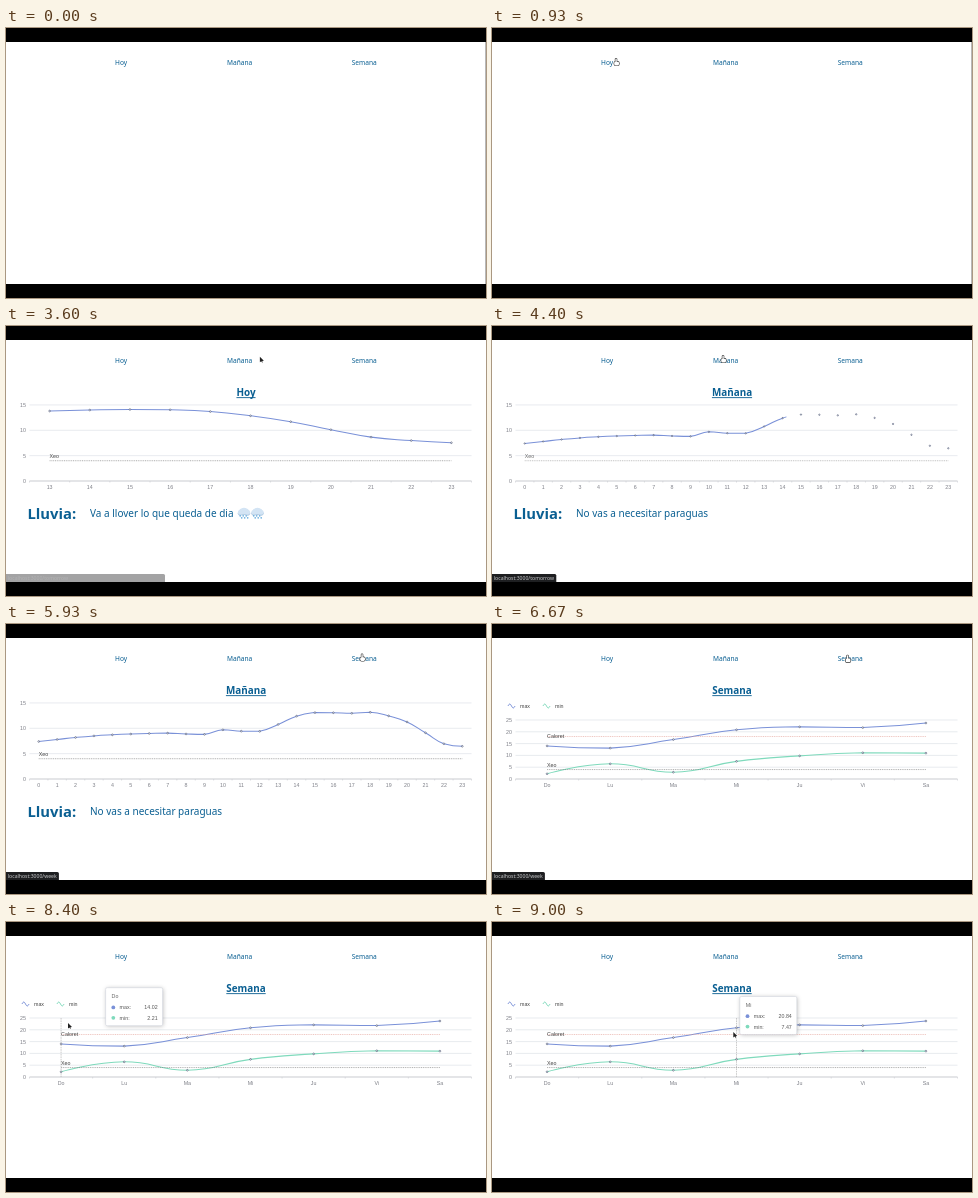
Write an HTML page with a canvas that moves like this. It is 480 by 270 pixels and loops after 9070 ms.

```html
<!DOCTYPE html>
<html lang="es">
<head>
<meta charset="utf-8">
<title>Tiempo</title>
<style>
html, body { margin: 0; width: 100%; height: 100%; overflow: hidden; background: #000; }
canvas { display: block; width: 480px; height: 270px; }
</style>
</head>
<body>
<canvas id="stage"></canvas>
<script>
const LOOP = 9070;
const canvas = document.getElementById('stage');
const ctx = canvas.getContext('2d');
const dpr = window.devicePixelRatio || 1;
canvas.width = 480 * dpr;
canvas.height = 270 * dpr;

const UI = '"Noto Sans", "Open Sans", sans-serif';
const PLOT = '"Liberation Sans", Arial, sans-serif';
const TEAL = '#0a5f92', BLUE = '#7a91d8', GREEN = '#7fdabc', GREY = '#7c7e86';
const LEFT = 23.5, RIGHT = 465.5, BASE = 155;

const clamp = (v, a, b) => Math.max(a, Math.min(b, v));
const ramp = (t, a, b) => clamp((t - a) / (b - a), 0, 1);
const ease = p => p * p * (3 - 2 * p);
const range = (from, to) => Array.from({ length: to - from + 1 }, (_, i) => from + i);

// smooth curve through a few [hour, degrees] knots
function curve(knots) {
  const slope = i => {
    const a = knots[Math.max(i - 1, 0)], b = knots[Math.min(i + 1, knots.length - 1)];
    return (b[1] - a[1]) / (b[0] - a[0]);
  };
  return x => {
    let i = 0;
    while (i < knots.length - 2 && knots[i + 1][0] < x) i++;
    const [x0, y0] = knots[i], [x1, y1] = knots[i + 1];
    const h = x1 - x0, u = (x - x0) / h;
    return y0 + (y1 - y0) * ease(u) + h * u * (1 - u) * ((1 - u) * slope(i) - u * slope(i + 1));
  };
}

const XEO = { name: 'Xeo', value: 4, color: '#777', lift: 3 };
const CALORET = { name: 'Caloret', value: 18, color: '#e39c93', lift: -1.9 };

function dayPage(title, start, sweep, from, rain, snow, knots) {
  const labels = range(from, 23);
  return {
    title, start, sweep, labels, rain, snow, unit: 5.07, top: 15, marks: [XEO],
    series: [{ color: BLUE, data: labels.map(curve(knots)) }]
  };
}

const pages = [
  dayPage('Hoy', 1600, [1690, 2150], 13, 'Va a llover lo que queda de dia', true,
    [[13, 13.8], [15, 14.1], [17, 13.7], [19, 11.7], [21, 8.65], [23, 7.55]]),
  dayPage('Mañana', 4195, [4165, 4550], 0, 'No vas a necesitar paraguas', false,
    [[0, 7.4], [3, 8.5], [7, 9.05], [9, 8.8], [10, 9.7], [12, 9.4], [14, 12.4], [15, 13.1],
      [17, 12.95], [18, 13.15], [20, 11.25], [22, 6.95], [23, 6.45]]),
  {
    title: 'Semana', start: 6130, sweep: [6120, 6520], unit: 2.36, top: 25, legend: true,
    labels: ['Do', 'Lu', 'Ma', 'Mi', 'Ju', 'Vi', 'Sa'], marks: [CALORET, XEO],
    series: [
      { name: 'max', color: BLUE, data: [14.02, 13.08, 16.71, 20.84, 22.09, 21.78, 23.72] },
      { name: 'min', color: GREEN, data: [2.21, 6.42, 2.87, 7.47, 9.79, 11.12, 10.96] }
    ]
  }
];

const NAV = [['Hoy', 109, 124], ['Mañana', 221, 248], ['Semana', 345.7, 373]];

// pointer moves: start, end, x, y
const moves = [
  [70, 930, 124, 30.5], [1000, 1330, 115, 29.5], [2930, 3330, 258, 31], [3470, 4000, 231, 29.5],
  [4870, 5470, 356, 30], [6600, 7000, 350, 46], [7070, 7500, 306, 111], [7580, 7670, 308, 102.5],
  [8000, 8400, 62, 101], [8500, 8870, 241.3, 110]
];

function pointer(t) {
  let x = 478, y = 78;
  for (const [from, to, mx, my] of moves) {
    const p = ease(ramp(t, from, to));
    x += (mx - x) * p;
    y += (my - y) * p;
  }
  return { x, y };
}

function text(s, x, y, size, color, { font = UI, align = 'left', weight = 400 } = {}) {
  ctx.font = `${weight} ${size}px ${font}`;
  ctx.textAlign = align;
  ctx.fillStyle = color;
  ctx.fillText(s, x, y);
}

const plotText = (s, x, y, color = GREY, align = 'left') =>
  text(s, x, y, 5.3, color, { font: PLOT, align });

function line(x0, y0, x1, y1, color, width = 0.7, dash = []) {
  ctx.strokeStyle = color;
  ctx.lineWidth = width;
  ctx.setLineDash(dash);
  ctx.beginPath();
  ctx.moveTo(x0, y0);
  ctx.lineTo(x1, y1);
  ctx.stroke();
  ctx.setLineDash([]);
}

function disc(x, y, r, fill) {
  ctx.beginPath();
  ctx.arc(x, y, r, 0, Math.PI * 2);
  ctx.fillStyle = fill;
  ctx.fill();
}

function box(x, y, w, h, r, fill) {
  ctx.beginPath();
  ctx.roundRect(x, y, w, h, r);
  ctx.fillStyle = fill;
  ctx.fill();
}

const edge = (page, i) => LEFT + (RIGHT - LEFT) / page.labels.length * i;
const column = (page, i) => edge(page, i + 0.5);

function smoothPath(pts) {
  const bound = (v, a, b) => clamp(v, Math.min(a, b), Math.max(a, b));
  const dx = (pts[1].x - pts[0].x) / 2;
  const arm = pts.map((p, i) => {
    const a = pts[i - 1], b = pts[i + 1];
    return a && b ? { x: dx, y: (b.y - a.y) / 4 } : { x: 0, y: 0 };
  });
  ctx.beginPath();
  ctx.moveTo(pts[0].x, pts[0].y);
  for (let i = 1; i < pts.length; i++) {
    const a = pts[i - 1], b = pts[i], u = arm[i - 1], v = arm[i];
    ctx.bezierCurveTo(
      a.x + u.x, bound(a.y + u.y, a.y, b.y),
      b.x - v.x, bound(b.y - v.y, a.y, b.y), b.x, b.y);
  }
}

function drawSeries(page, s, p) {
  const pts = s.data.map((v, i) => ({ x: column(page, i), y: BASE - v * page.unit }));
  ctx.save();
  ctx.beginPath();
  ctx.rect(LEFT, 60, (RIGHT - LEFT) * p, 120);
  ctx.clip();
  smoothPath(pts);
  ctx.strokeStyle = s.color;
  ctx.lineWidth = 1.05;
  ctx.stroke();
  ctx.restore();
  for (const q of pts) {
    disc(q.x, q.y, 0.4 + 0.45 * p, '#fff');
    ctx.strokeStyle = '#46506e';
    ctx.lineWidth = 0.6;
    ctx.stroke();
  }
}

function legendItem(x, s) {
  ctx.beginPath();
  for (let i = 0; i <= 7; i += 0.5) ctx.lineTo(x + i, 82 - 2 * Math.sin(i / 7 * Math.PI * 2));
  ctx.strokeStyle = s.color;
  ctx.lineWidth = 1;
  ctx.stroke();
  plotText(s.name, x + 12, 84, '#444');
}

function drawChart(page, t) {
  const p = ramp(t, ...page.sweep), n = page.labels.length;
  for (let v = 0; v <= page.top; v += 5) {
    const y = BASE - v * page.unit;
    line(LEFT, y, RIGHT, y, v ? '#dfe2e9' : '#b4b6bc');
    plotText(v, 20, y + 2, GREY, 'right');
  }
  page.labels.forEach((s, i) => plotText(s, column(page, i), 162.7, GREY, 'center'));
  for (let i = 0; i <= n; i++) line(edge(page, i), BASE, edge(page, i), BASE + 1.6, '#c4c6cc', 0.5);
  for (const s of page.series) drawSeries(page, s, p);
  ctx.globalAlpha = 0.4 + 0.6 * p;
  for (const m of page.marks) {
    const y = BASE - m.value * page.unit;
    line(column(page, 0), y, column(page, n - 1), y, m.color, 0.6, [1, 0.8]);
    plotText(m.name, column(page, 0), y - m.lift, '#444');
  }
  ctx.globalAlpha = 1;
  if (page.legend) page.series.forEach((s, i) => legendItem(16 + 35 * i, s));
}

function snowCloud(x, y) {
  for (const [drop, fill] of [[0.6, '#a9c4de'], [-0.2, '#d3e4f4']]) {
    for (let i = -2; i <= 2; i++) {
      const hump = Math.cos(i * 0.7);
      disc(x + i * 1.9, y - 1.8 * hump + drop, 2.2 + hump, fill);
    }
  }
  for (let i = 0; i < 6; i++) disc(x - 3.8 + i * 1.5, y + 2.8 + (i % 2) * 2, 0.85, '#6fb0de');
}

function drawPage(page, t) {
  text(page.title, 240, 70, 9.9, TEAL, { weight: 700, align: 'center' });
  const w = ctx.measureText(page.title).width;
  ctx.fillRect(240 - w / 2, 71.2, w, 0.9);
  drawChart(page, t);
  if (!page.rain) return;
  text('Lluvia:', 21.5, 193, 14.8, TEAL, { weight: 700 });
  text(page.rain, 84, 191, 10, TEAL);
  if (page.snow) for (const x of [238, 251.5]) snowCloud(x, 187);
}

function drawTooltip(page, t) {
  const shown = ramp(t, 7380, 7480);
  if (!shown) return;
  const now = pointer(t), late = pointer(t - 90);
  const i = clamp(Math.floor((now.x - LEFT) / (RIGHT - LEFT) * 7), 0, 6);
  const ax = column(page, i), x = late.x + 6.5, y = late.y - 35.5;
  line(ax, 96, ax, BASE, '#aaa', 0.6, [1.6, 0.8]);
  ctx.globalAlpha = shown;
  ctx.save();
  ctx.shadowColor = 'rgba(0,0,0,.25)';
  ctx.shadowBlur = 4 * dpr;
  ctx.shadowOffsetX = ctx.shadowOffsetY = 0.6 * dpr;
  box(x, y, 57, 38, 1.5, '#fff');
  ctx.restore();
  ctx.strokeStyle = '#ccd0da';
  ctx.lineWidth = 0.5;
  ctx.stroke();
  plotText(page.labels[i], x + 6, y + 10.7, '#666');
  page.series.forEach((s, k) => {
    const row = y + 19.7 + 10.4 * k;
    disc(x + 7.7, row, 1.9, s.color);
    plotText(s.name + ':', x + 14, row + 1.9, '#555');
    plotText(s.data[i].toFixed(2), x + 52, row + 1.9, '#555', 'right');
  });
  ctx.globalAlpha = 1;
}

// path, fade-in, fade-out, time of widening
const bubbles = [
  ['today', 1130, 3130, 1850], ['tomorrow', 3130, 3500, 0],
  ['tomorrow', 3800, 4990, LOOP], ['week', 5640, 7080, LOOP]
];

function drawStatus(t) {
  for (const [path, from, to, widen] of bubbles) {
    const alpha = ramp(t, from - 20, from + 90) * (1 - ramp(t, to, to + 170));
    if (!alpha) continue;
    const label = 'localhost:3000/' + path;
    ctx.font = `5.1px ${UI}`;
    const snug = ctx.measureText(label).width + 4;
    ctx.globalAlpha = alpha;
    box(0, 248, snug + (159 - snug) * ease(ramp(t, widen, widen + 350)), 8, [0, 1.5, 0, 0], '#1e1f21');
    text(label, 1.8, 253.8, 5.1, '#c9cacc');
    ctx.globalAlpha = 1;
  }
}

function outlined(fill, stroke) {
  ctx.lineJoin = 'round';
  ctx.lineWidth = 1.2;
  ctx.strokeStyle = stroke;
  ctx.fillStyle = fill;
  ctx.stroke();
  ctx.fill();
}

function arrow(x, y) {
  ctx.beginPath();
  for (const [dx, dy] of [[0, 0], [0, 5.6], [1.4, 4.5], [2.6, 6.6], [2.5, 4.2], [4, 4]]) {
    ctx.lineTo(x + dx, y + dy);
  }
  ctx.closePath();
  outlined('#222', '#fff');
}

function hand(x, y) {
  ctx.beginPath();
  ctx.roundRect(x - 0.6, y, 1.3, 5, 0.6);
  ctx.roundRect(x - 1.8, y + 3.2, 4.8, 3.8, 1.4);
  outlined('#fff', '#333');
}

function drawPointer(t) {
  if (t < 70) return;
  const { x, y } = pointer(t);
  const over = y > 28 && y < 41 && NAV.some(([, a, b]) => x >= a - 1 && x <= b + 1);
  (over ? hand : arrow)(x, y);
}

function draw(t) {
  ctx.setTransform(dpr, 0, 0, dpr, 0, 0);
  ctx.fillStyle = '#000';
  ctx.fillRect(0, 0, 480, 270);
  ctx.fillStyle = '#fff';
  ctx.fillRect(0, 14, 480, 242);
  const page = pages.filter(p => t >= p.start).pop();
  if (!page) line(479.5, 14, 479.5, 256, '#b8b8b8', 1);
  for (const [name, x] of NAV) text(name, x, 36.6, 6.6, TEAL, { weight: 500 });
  if (page) {
    drawPage(page, t);
    if (page.legend) drawTooltip(page, t);
  }
  drawStatus(t);
  drawPointer(t);
}

const begin = performance.now();
function tick() {
  draw((performance.now() - begin) % LOOP);
  requestAnimationFrame(tick);
}
tick();
</script>
</body>
</html>
```
